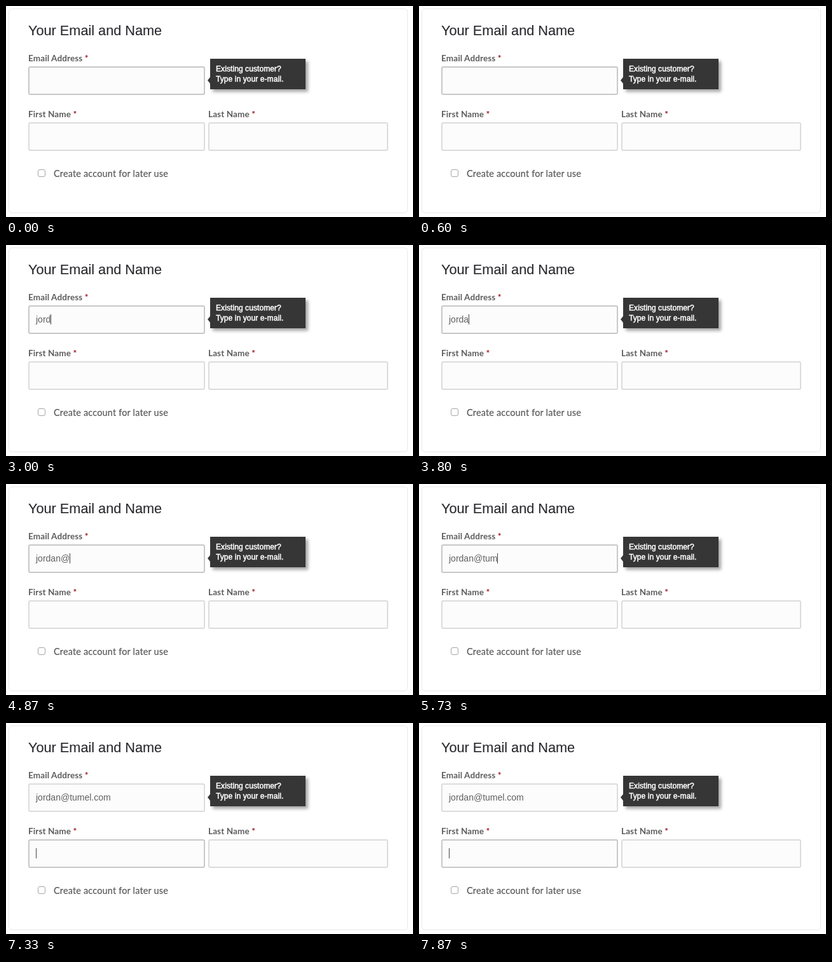
Animation, 640 px wide and 332 px high, one loop 8 s. Source, as an HTML page:

```html
<!DOCTYPE html>
<html lang="en">
<head>
<meta charset="utf-8">
<title>Email and name form</title>
<style>
  html, body { margin: 0; width: 100%; height: 100%; overflow: hidden; background: #fff; }
  svg { display: block; width: 640px; height: 332px; }
  text { font-family: Lato, "Open Sans", sans-serif; fill: #555; white-space: pre; }
  .title, .input, .tip { font-family: "Liberation Sans", Arial, sans-serif; }
  .title { font-size: 21.7px; fill: #2b2b30; stroke: #2b2b30; stroke-width: .15px; }
  .label { font-size: 13.5px; font-weight: 700; letter-spacing: .12px; fill: #5c5c5c; }
  .star { fill: #a01520; }
  .body { font-size: 14.4px; letter-spacing: .2px; stroke: #555; stroke-width: .15px; }
  .input { font-size: 14px; fill: #606060; }
  .tip { font-size: 12px; letter-spacing: .08px; fill: #fff; stroke: #fff; stroke-width: .5px; }
  .card { fill: #fff; stroke: #e8e8e8; }
  .field { fill: #fcfcfc; stroke: #dcdcdc; stroke-width: 2px; }
  .field.focus { stroke: #c8c8c8; }
  .bubble { fill: #363636; filter: drop-shadow(4px 4px 2.5px rgba(0, 0, 0, .35)); }
  .box { fill: #fff; stroke: #a6a6a6; }
  #caret { fill: #444; }
</style>
</head>
<body>
<svg viewBox="0 0 640 332">
  <rect class="card" x="4.5" y="4.5" width="627" height="321" rx="5"/>
  <text class="title" x="35" y="46">Your Email and Name</text>

  <text class="label" x="35" y="87">Email Address <tspan class="star">*</tspan></text>
  <rect class="field" id="email" x="36" y="96" width="276" height="43" rx="2"/>
  <text class="input" id="typed" x="47" y="122"></text>

  <text class="label" x="35" y="175">First Name <tspan class="star">*</tspan></text>
  <rect class="field" id="first" x="36" y="184" width="276" height="43" rx="2"/>

  <text class="label" x="318" y="175">Last Name <tspan class="star">*</tspan></text>
  <rect class="field" x="319" y="184" width="281" height="43" rx="2"/>

  <rect class="box" x="50.5" y="257.5" width="11" height="11" rx="2.5"/>
  <text class="body" x="75" y="269">Create account for later use</text>

  <path class="bubble" d="M321 83H471V131H321V122L317 117L321 112Z"/>
  <text class="tip" x="330" y="103">Existing customer?</text>
  <text class="tip" x="330" y="119">Type in your e-mail.</text>

  <rect id="caret" width="1" height="16"/>
</svg>
<script>
  const LOOP = 8000;
  const ADDRESS = 'jordan@tumel.com';
  // time of each key press
  const KEYS = [1600, 1870, 2270, 3000, 3270, 4130, 4870, 5270, 5470, 5670,
                5870, 6070, 6270, 6400, 6530, 6670];
  const TAB = 7270;
  const BLINK = [[70, 600], [1130, LOOP]];

  const get = id => document.getElementById(id);
  const email = get('email'), first = get('first');
  const typed = get('typed'), caret = get('caret');

  function draw(now) {
    const t = now % LOOP;
    const count = KEYS.filter(k => k <= t).length;
    const tabbed = t >= TAB;
    const text = ADDRESS.slice(0, count);
    if (typed.textContent !== text) typed.textContent = text;

    email.classList.toggle('focus', !tabbed);
    first.classList.toggle('focus', tabbed);

    const on = BLINK.some(([from, to]) => t >= from && t < to);
    const width = tabbed || !count ? 0 : typed.getComputedTextLength();
    caret.setAttribute('x', Math.round(47 + width));
    caret.setAttribute('y', tabbed ? 197 : 109);
    caret.setAttribute('visibility', on ? 'visible' : 'hidden');
  }

  const start = performance.now();
  function tick() {
    draw(performance.now() - start);
    requestAnimationFrame(tick);
  }
  draw(0);
  requestAnimationFrame(tick);
</script>
</body>
</html>
```
